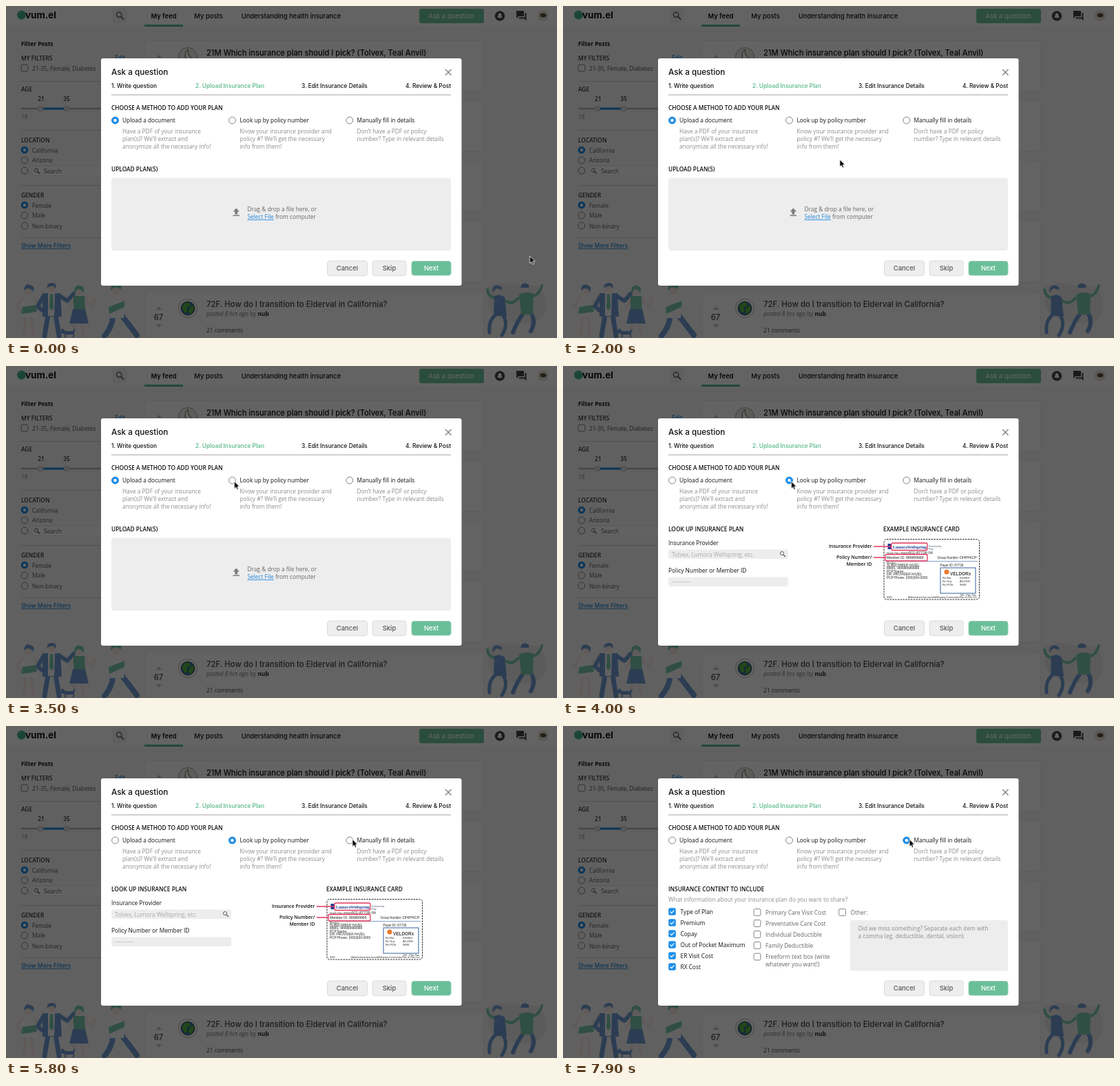
Animation of 800x482 px, one loop 8 s. Source, as an HTML page:

```html
<!DOCTYPE html>
<html lang="en">
<head>
<meta charset="utf-8">
<title>Ask a question</title>
<style>
html, body { margin: 0; width: 100%; height: 100%; overflow: hidden; background: #626262; }
svg { display: block; width: 100vw; height: 100vh; }
text { font: 400 8.33px "Open Sans", "Noto Sans", sans-serif; fill: #111; white-space: pre; }
.ui text, text.ui { font-family: Inter, Roboto, sans-serif; font-weight: 500; }
.mid, .mid text { text-anchor: middle; }
.end { text-anchor: end; }
.nav text { font-size: 9.45px; }
text.cap { font-weight: 600; }
.grey text, text.grey { fill: #8b8b8b; }
.soft text, text.soft { fill: #666; }
.side text { fill: #555; }
.side text.cap { fill: #333; }
.link, .side text.link { fill: #1e88dd; text-decoration: underline; }
.rule { stroke: #c4c4c4; stroke-width: .8; }
.field { fill: #eeedee; }
.card { fill: #fff; stroke: #ececec; }
.fine text { font-family: "Liberation Sans", Arial, sans-serif; font-size: 4.5px; fill: #222; }
.crowd { opacity: .65; }
.limb { fill: none; stroke-linecap: round; stroke-linejoin: round; }
.navy { fill: #2a6fc4; } .green { fill: #3cb78c; } .skin { fill: #f6e3da; } .pale { fill: #fff; }
.limb .navy { fill: none; stroke: #2a6fc4; } .limb .green { fill: none; stroke: #3cb78c; }
.limb .skin { fill: none; stroke: #f6e3da; } .limb .pale { fill: none; stroke: #fff; }

.view { opacity: 0; animation: 8s step-end infinite; }
#upload { animation-name: upload; }
#lookup { animation-name: lookup; }
#manual { animation-name: manual; }
#cursor { animation: travel 8s linear infinite; }
@keyframes upload { 0% { opacity: 1 } 46.25%, 100% { opacity: 0 } }
@keyframes lookup { 0% { opacity: 0 } 46.25% { opacity: 1 } 85%, 100% { opacity: 0 } }
@keyframes manual { 0% { opacity: 0 } 85%, 100% { opacity: 1 } }
@keyframes travel {
  0% { transform: translate(760.5px, 363px); }
  1.25% { transform: translate(760.5px, 363px); animation-timing-function: cubic-bezier(.45, 0, .75, .8); }
  25% { transform: translate(402px, 223px); animation-timing-function: cubic-bezier(.25, .5, .5, 1); }
  36.25% { transform: translate(331.5px, 167.5px); }
  55% { transform: translate(331.5px, 167.5px); animation-timing-function: ease-in-out; }
  70%, 100% { transform: translate(503px, 164.5px); }
}
</style>
</head>
<body>
<svg viewBox="0 0 800 482" preserveAspectRatio="none">
<defs>
  <circle id="off" r="4.9" fill="none" stroke="#777" stroke-width=".9"/>
  <g id="on"><circle r="5.3" fill="#1e8fea"/><circle r="2.2" fill="#fff"/></g>
  <rect id="box" x="-4.9" y="-4.9" width="9.8" height="9.8" rx="1.8" fill="none" stroke="#777" stroke-width=".9"/>
  <g id="tick"><rect x="-5.3" y="-5.3" width="10.6" height="10.6" rx="2" fill="#1e8fea"/><path d="M-2.8 0L-.8 2.2L3-2.2" fill="none" stroke="#fff" stroke-width="1.2"/></g>
  <g id="lens" fill="none" stroke="#666"><circle cx="-1" cy="-1" r="2.6"/><path d="M1 1L4 4" stroke-width="1.4"/></g>
</defs>

<!-- Page behind the dialog -->
<rect width="800" height="482" fill="#f9f9f9"/>
<rect width="800" height="30" fill="#fff"/>
<g class="ui nav mid">
  <circle cx="22.500" cy="13" r="6.500" fill="#45b48a"/>
  <text x="50.500" y="18" style="font-size:13.500px;font-weight:700">vum.el</text>
  <rect x="155" y="4" width="21" height="21" rx="3" fill="#f5f5f5"/>
  <use href="#lens" transform="translate(165.500 14) scale(1.4)"/>
  <text x="229" y="18" style="font-weight:600">My feed</text>
  <rect x="201" y="27" width="56" height="3" fill="#5bbd92"/>
  <text x="294" y="18">My posts</text>
  <text x="414" y="18">Understanding health insurance</text>
  <rect x="600" y="4" width="94" height="21" rx="3" fill="#6fc7a0"/>
  <text x="646.500" y="18" style="fill:#fff">Ask a question</text>
  <circle cx="717" cy="14.500" r="7.200" fill="#444"/>
  <path d="M713.500 17V16L714.500 15V13Q714.500 10.500 717 10.300Q719.500 10.500 719.500 13V15L720.500 16V17ZM716 18H718L717 19Z" fill="#fff"/>
  <path d="M741 7H752V15H744L741 18ZM753.500 10H755.500V21.500L752.500 18.500H744.500V16.500H753.500Z" fill="#444"/>
  <circle cx="779.500" cy="14.500" r="8" fill="#e9e4da"/>
  <ellipse cx="780" cy="13.500" rx="4.500" ry="3" fill="#5c5038"/>
</g>

<g class="side">
  <text class="cap" x="22" y="58" style="fill:#111;font-weight:700">Filter Posts</text>
  <text class="cap" x="22" y="78.500">MY FILTERS</text>
  <text class="link cap" x="158" y="78">Edit</text>
  <use href="#box" x="27" y="90"/><text x="38" y="93.500">21-35, Female, Diabetes</text>
  <path class="rule" d="M22 109.500H173M22 180.500H173M22 260.500H173M22 336.500H173"/>
  <text class="cap" x="22" y="124">AGE</text>
  <g class="mid"><text class="cap" x="51" y="138">21</text><text class="cap" x="88" y="138">35</text></g>
  <path d="M22 149H173" stroke="#bbb" stroke-width="2.500"/>
  <path d="M50 149H88" stroke="#1e88dd" stroke-width="3"/>
  <g fill="#e2e2e2" stroke="#bbb" stroke-width=".5"><circle cx="50" cy="149" r="4"/><circle cx="88" cy="149" r="4"/></g>
  <text x="22" y="164" style="fill:#888">18</text>
  <text class="cap" x="22" y="198">LOCATION</text>
  <use href="#on" x="27" y="209"/><text x="38" y="212.500">California</text>
  <use href="#off" x="27" y="224"/><text x="38" y="227">Arizona</text>
  <use href="#off" x="27" y="239"/>
  <rect x="38" y="232.500" width="135" height="14" rx="2" fill="#fff" stroke="#e5e5e5" stroke-width=".6"/>
  <use href="#lens" x="45" y="239.500"/><text x="55" y="242.500">Search</text>
  <text class="cap" x="22" y="278">GENDER</text>
  <use href="#on" x="27" y="289"/><text x="38" y="292.500">Female</text>
  <use href="#off" x="27" y="304"/><text x="38" y="307">Male</text>
  <use href="#off" x="27" y="319"/><text x="38" y="322.500">Non-binary</text>
  <text class="link cap" x="22" y="351">Show More Filters</text>
</g>

<!-- Left crowd -->
<g class="crowd">
  <g class="limb">
    <path class="skin" d="M28 450L26 479M37 450L39 479" stroke-width="4"/>
    <path class="skin" d="M25 424L15 436L24 443M40 424L47 434" stroke-width="4"/>
    <path class="navy" d="M61 448L56 479M72 448L77 479" stroke-width="7"/>
    <path class="navy" d="M54 422L46 436L53 442M78 421L89 428L98 418" stroke-width="6"/>
    <path class="skin" d="M100 456L98 479M110 456L113 479" stroke-width="4"/>
    <path class="skin" d="M98 425L92 440M114 424L124 436L130 424" stroke-width="4"/>
    <path class="navy" d="M155 448Q156 464 143 479M167 448Q178 462 190 478" stroke-width="8"/>
    <path class="pale" d="M152 423L139 432L132 420M170 422L185 432L199 424" stroke-width="6"/>
  </g>
  <path class="pale" d="M26 421H40L46 452H21Z"/>
  <path class="green" d="M24 437L43 434L45 444L22 447Z"/>
  <circle class="skin" cx="33" cy="413" r="5.500"/>
  <path class="navy" d="M26 413Q27 402 35 405Q43 407 39 415Q35 408 29 411Z"/>
  <path class="navy" d="M53 417H79L81 451H53Z"/>
  <path class="pale" d="M61 417H71L70 450H61Z"/>
  <path class="green" d="M64 418H68L69 438L66 442L63 438Z"/>
  <circle class="skin" cx="66" cy="410" r="5.500"/>
  <path class="navy" d="M59 409Q60 401 68 402Q74 403 72 410L68 406Z"/>
  <path class="green" d="M98 421H114L115 442H98Z"/>
  <path class="navy" d="M97 440H115L120 461H92Z"/>
  <circle class="skin" cx="106" cy="414" r="5"/>
  <path class="green" d="M99 418Q98 404 108 406Q116 409 112 417Q109 410 104 411Z"/>
  <path class="pale" d="M149 419H172L171 453H150Z"/>
  <path class="green" d="M149 437L172 428V437L150 447Z"/>
  <circle class="skin" cx="160" cy="412" r="6"/>
  <path class="green" d="M152 413Q151 402 161 403Q170 404 167 411L158 408Z"/>
  <path class="navy" d="M79 471L82 468L86 472H97L101 467L99 475V481H97V477H87V481H85V476L80 475Z"/>
</g>
<!-- Right pair -->
<g class="crowd">
  <path d="M698 408Q720 398 748 406Q778 400 784 426Q788 456 762 460Q716 462 700 438Z" fill="#e6e6e6"/>
  <g class="limb">
    <path class="navy" d="M716 446Q700 452 702 474M722 449Q730 462 720 478" stroke-width="5"/>
    <path class="green" d="M710 424Q700 422 699 412M722 426Q734 436 744 424" stroke-width="4"/>
    <path class="navy" d="M752 445Q742 458 736 474M762 445Q770 458 762 472" stroke-width="6"/>
    <path class="green" d="M763 422Q774 420 778 406" stroke-width="4"/>
  </g>
  <path class="navy" d="M709 421Q717 417 724 423L727 450H708Z"/>
  <circle class="skin" cx="713" cy="413" r="5"/>
  <path class="navy" d="M706 416Q706 403 716 406Q722 408 720 412L712 410Z"/>
  <path class="green" d="M745 419Q755 413 766 418L765 448H748Z"/>
  <circle class="skin" cx="754" cy="410" r="5"/>
  <path class="navy" d="M747 409Q748 401 756 403Q761 405 759 409Z"/>
</g>

<g class="card">
  <rect x="202" y="50" width="491.500" height="73" rx="4"/><rect x="202" y="137" width="491.500" height="74" rx="4"/>
  <rect x="202" y="224" width="491.500" height="74" rx="4"/><rect x="202" y="311" width="491.500" height="90" rx="4"/>
  <rect x="202" y="415" width="491.500" height="90" rx="4"/>
</g>
<circle cx="264" cy="74" r="13.500" fill="#f4efe9" stroke="#777" stroke-width=".7"/>
<path d="M264 63Q257 70 262 78H275Q264 76 264 63Z" fill="#fff" stroke="#333" stroke-width=".8"/>
<path d="M218 75L222 71L226 75ZM218 441L222 436L226 441ZM218 462H226L222 467Z" fill="#c4c4c4"/>
<text class="ui" x="291" y="72" style="font-size:11.150px">21M Which insurance plan should I pick? (Tolvex, Teal Anvil)</text>
<text class="ui" x="291" y="436.500" style="font-size:11.400px;fill:#444">72F. How do I transition to Elderval in California?</text>
<text class="ui mid" x="221.500" y="456" style="font-size:11.200px;fill:#444">67</text>
<circle cx="264" cy="439" r="13.500" fill="#fff" stroke="#999" stroke-width=".7"/>
<circle cx="264" cy="439" r="9.800" fill="#347bc2" stroke="#223" stroke-width=".8"/>
<path d="M255 437Q258 429 266 430L269 435L263 438L264 444L259 446ZM266 438L272 434L273 441L268 448L264 445Z" fill="#58b548" stroke="#223" stroke-width=".4"/>
<text x="291" y="450" style="fill:#777"><tspan font-style="italic">posted 8 hrs ago</tspan> by <tspan style="font-weight:700;fill:#222">nub</tspan></text>
<text x="291" y="474" style="fill:#444">21 comments</text>
<rect width="800" height="482" opacity=".61"/>

<!-- Dialog -->
<rect x="138" y="76" width="523.500" height="330" rx="3" fill="#fff"/>
<g class="ui">
  <text x="153" y="100" style="font-size:11.700px">Ask a question</text>
  <text x="153" y="119">1. Write question</text>
  <text x="275" y="119" style="font-weight:600;fill:#6abf99">2. Upload Insurance Plan</text>
  <text x="429" y="119">3. Edit Insurance Details</text>
  <text class="end" x="646" y="119">4. Review &amp; Post</text>
</g>
<path d="M638 92L646.500 100.500M646.500 92L638 100.500" stroke="#777" stroke-width="1.100"/>
<path d="M153 129H646" stroke="#999" stroke-width=".9"/>
<text class="cap" x="153" y="151">CHOOSE A METHOD TO ADD YOUR PLAN</text>
<use href="#off" x="158.500" y="166"/><use href="#off" x="328.500" y="166"/><use href="#off" x="498.800" y="166"/>
<text x="169" y="169">Upload a document</text>
<text x="339.500" y="169">Look up by policy number</text>
<text x="509.500" y="169">Manually fill in details</text>
<g class="grey">
  <text x="169" y="184.500">Have a PDF of your insurance</text>
  <text x="169" y="195.500">plan(s)? We’ll extract and</text>
  <text x="169" y="206.500">anonymize all the necessary info!</text>
  <text x="339.500" y="184.500">Know your insurance provider and</text>
  <text x="339.500" y="195.500">policy #? We’ll get the necessary</text>
  <text x="339.500" y="206.500">info from them!</text>
  <text x="509.500" y="184.500">Don’t have a PDF or policy</text>
  <text x="509.500" y="195.500">number? Type in relevant details</text>
</g>
<g class="ui nav mid">
  <g fill="#eee" stroke="#d8d8d8" stroke-width=".9">
    <rect x="466.500" y="370" width="58" height="21.500" rx="3.500"/>
    <rect x="532" y="370" width="49" height="21.500" rx="3.500"/>
    <rect x="589" y="370.500" width="57" height="20.500" rx="3.500" fill="#6abf99" stroke="#8ccdb0"/>
  </g>
  <text x="495.500" y="384" style="fill:#555">Cancel</text>
  <text x="556.500" y="384" style="fill:#555">Skip</text>
  <text x="617.500" y="384" style="fill:#fff">Next</text>
</g>

<g class="view" id="upload">
  <use href="#on" x="158.500" y="166"/>
  <text class="cap" x="153" y="239.500">UPLOAD PLAN(S)</text>
  <rect class="field" x="153" y="249.500" width="493" height="105.500" rx="4"/>
  <path d="M334.300 293.500L339 298.500H336.200V302.500H332.400V298.500H329.600ZM329.600 303.500H339V305H329.600Z" fill="#7c7c7c"/>
  <g class="soft">
    <text x="350.500" y="298">Drag &amp; drop a file here, or</text>
    <text x="350.500" y="309"><tspan class="link">Select File</tspan> from computer</text>
  </g>
</g>

<g class="view" id="lookup">
  <use href="#on" x="328.500" y="166"/>
  <text class="cap" x="153" y="239.500">LOOK UP INSURANCE PLAN</text>
  <text x="153" y="260">Insurance Provider</text>
  <rect class="field" x="153" y="266.500" width="174" height="13.500" rx="3"/>
  <text x="158" y="276.500" style="fill:#aaa">Tolvex, Lumora Wellspring, etc.</text>
  <use href="#lens" x="319" y="273"/>
  <text x="153" y="299.500">Policy Number or Member ID</text>
  <rect class="field" x="153" y="306.500" width="174" height="13.500" rx="3"/>
  <text x="158" y="316" style="fill:#aaa">----------</text>
  <text class="cap" x="465" y="239.500">EXAMPLE INSURANCE CARD</text>
  <g class="end">
    <text class="cap" x="448.500" y="264" style="font-size:6.900px">Insurance Provider</text>
    <text class="cap" x="448.500" y="280" style="font-size:6.900px">Policy Number/</text>
    <text class="cap" x="448.500" y="289.500" style="font-size:6.900px">Member ID</text>
  </g>
  <rect x="466" y="251.500" width="138.500" height="87.500" rx="4" fill="#fff" stroke="#222" stroke-dasharray="2.500 1.300"/>
  <g class="fine">
    <rect x="471.500" y="258" width="5" height="8" fill="#1f3f92"/>
    <text x="479" y="264.500" style="font:700 6px 'Liberation Serif',serif;fill:#1f3f92">LumoraWellspring</text>
    <text x="531" y="262.500" style="font-size:3.600px;fill:#456">Community</text>
    <text x="531" y="266.500" style="font-size:3.600px;fill:#456">Plan</text>
    <text x="470" y="272.500" style="font-size:3.600px">Health Plan (80840)</text>
    <text x="502" y="273" style="font-size:5.700px">911-87726-04</text>
    <text x="470" y="280.300" style="font-size:5.100px">Member ID: 999999999</text>
    <text x="543.500" y="279.500">Group Number:</text>
    <text x="575.500" y="279.500" style="font-size:5.900px">OHPHCP</text>
    <path d="M469 283.500H602" stroke="#2c62a8" stroke-width=".6"/>
    <text x="470" y="286.500" style="font-size:3.500px">Member:</text>
    <text x="470" y="290.500" style="font-size:4.800px">SUBSCRIBER HAZEL</text>
    <text x="470" y="295" style="font-size:4.800px">MMIS: 999999999999</text>
    <text x="470" y="299.500" style="font-size:4.800px">PCP Name:</text>
    <text x="470" y="304" style="font-size:4.800px">DR. PROVIDER HAZEL</text>
    <text x="470" y="308.500" style="font-size:4.800px">PCP Phone: (000)000-0000</text>
    <text x="547.500" y="290.500" style="font-size:4.700px">Payer ID: 87726</text>
    <rect x="548" y="293" width="51" height="37" fill="none" stroke="#1d4f91" stroke-width=".9"/>
    <circle cx="557" cy="299" r="3.500" fill="#ec7a2c"/>
    <text x="562" y="303.500" style="font-size:6.400px;font-weight:700;fill:#444">VELDORx</text>
    <text x="551" y="309.200" style="font-size:4.100px">Rx Bin:</text><text x="576" y="309.200" style="font-size:4.100px">610494</text>
    <text x="551" y="314.200" style="font-size:4.100px">Rx Grp:</text><text x="576" y="314.200" style="font-size:4.100px">ACUOH</text>
    <text x="551" y="319.200" style="font-size:4.100px">Rx PCN:</text><text x="576" y="319.200" style="font-size:4.100px">9999</text>
    <text class="end" x="600" y="333.500" style="font-size:3.600px">OH - Plan Two</text>
    <text x="470" y="337" style="font-size:3.600px">0501</text>
    <text class="end" x="602" y="337" style="font-size:3.500px">Administered by LumoraWellspring Community Plan of Ohio, Inc.</text>
  </g>
  <g fill="none" stroke="#e5355b" stroke-width="1.300">
    <path d="M451 262H477M451 278H468"/>
    <rect x="477" y="257" width="52" height="10.500" rx="2"/>
    <rect x="468" y="273.500" width="61" height="9.500" rx="2"/>
  </g>
</g>

<g class="view" id="manual">
  <use href="#on" x="498.800" y="166"/>
  <text class="cap" x="153" y="239.500">INSURANCE CONTENT TO INCLUDE</text>
  <text class="grey" x="153" y="255">What information about your insurance plan do you want to share?</text>
  <use href="#tick" x="158.500" y="269.500"/><text x="170.500" y="272.500">Type of Plan</text>
  <use href="#tick" x="158.500" y="285.500"/><text x="170.500" y="288.500">Premium</text>
  <use href="#tick" x="158.500" y="301.500"/><text x="170.500" y="304.500">Copay</text>
  <use href="#tick" x="158.500" y="317.500"/><text x="170.500" y="320.500">Out of Pocket Maximum</text>
  <use href="#tick" x="158.500" y="333.500"/><text x="170.500" y="336.500">ER Visit Cost</text>
  <use href="#tick" x="158.500" y="349.500"/><text x="170.500" y="352.500">RX Cost</text>
  <g class="soft">
    <use href="#box" x="282" y="270.500"/><text x="294" y="273.500">Primary Care Visit Cost</text>
    <use href="#box" x="282" y="286.500"/><text x="294" y="289.500">Preventative Care Cost</text>
    <use href="#box" x="282" y="302.500"/><text x="294" y="305.500">Individual Deductible</text>
    <use href="#box" x="282" y="318.500"/><text x="294" y="321.500">Family Deductible</text>
    <use href="#box" x="282" y="335"/><text x="294" y="337.500">Freeform text box (write</text>
    <text x="294" y="348.500">whatever you want!)</text>
    <use href="#box" x="405.500" y="270.500"/><text x="417.500" y="273.500">Other:</text>
  </g>
  <rect class="field" x="417" y="282" width="229" height="73.500" rx="3"/>
  <g class="grey">
    <text x="428.500" y="297">Did we miss something? Separate each item with</text>
    <text x="428.500" y="308">a comma (eg. deductible, dental, vision).</text>
  </g>
</g>

<path id="cursor" d="M0 0V10.600L2.400 8.400L4 12.100L5.900 11.300L4.300 7.700H7.600Z" fill="#000" stroke="#fff" stroke-width=".8"/>
</svg>
</body>
</html>
```
